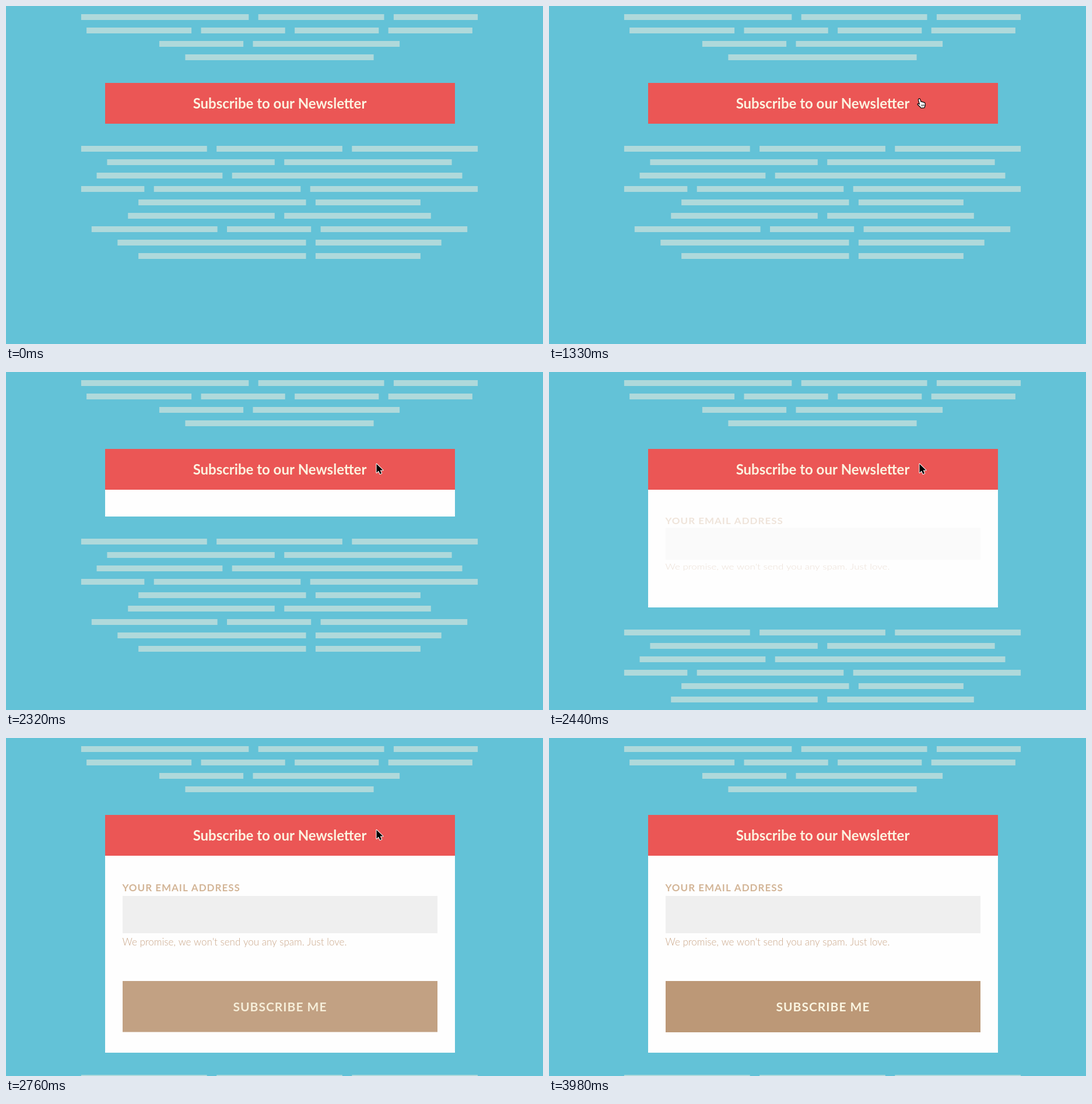
An HTML page with a canvas for the animation above (5300 ms loop, 921x580 px).

```html
<!DOCTYPE html>
<html lang="en">
<head>
<meta charset="utf-8">
<title>Newsletter</title>
<style>
  html, body { margin: 0; width: 100%; height: 100%; overflow: hidden; background: #63c2d7; }
  canvas { display: block; }
</style>
</head>
<body>
<canvas id="stage" width="921" height="580"></canvas>
<script>
const ctx = document.getElementById('stage').getContext('2d');
const LOOP = 5300;

const range = (start, step, count) => Array.from({ length: count }, (_, i) => start + i * step);
// Moments at which the picture is refreshed.
const ticks = [
  0, ...range(480, 70, 8), ...range(1030, 60, 6), 1660,
  2140, 2230, 2320, 2440, 2560, 2670, 2760, 2840, ...range(3200, 60, 14)
];

const clamp = v => Math.min(1, Math.max(0, v));
const progress = (t, start, end) => clamp((t - start) / (end - start));
const lerp = (a, b, p) => a.map((v, i) => v + (b[i] - v) * p);
const swing = p => 0.5 - Math.cos(Math.PI * p) / 2;
const easeOut = p => 1 - (1 - p) ** 2;
const bezier = (a, b, c, d, p) => a.map((v, i) =>
  (1 - p) ** 3 * v + 3 * (1 - p) ** 2 * p * b[i] + 3 * (1 - p) * p * p * c[i] + p ** 3 * d[i]);

function rect(color, x, y, w, h) {
  ctx.fillStyle = color;
  ctx.fillRect(x, y, w, h);
}

function text(str, x, y, color, font, align = 'left', spacing = 0) {
  ctx.font = font + ' Lato, sans-serif';
  ctx.textAlign = align;
  ctx.letterSpacing = spacing + 'px';
  ctx.fillStyle = color;
  ctx.fillText(str, x, y);
}

// Placeholder paragraphs: word lengths per centred line.
const INTRO = [[8, 6, 4], [5, 4, 4, 4], [4, 7], [9]];
const OUTRO = [[6, 6, 6], [8, 8], [6, 11], [3, 7, 8], [8, 5], [7, 7], [6, 4, 7], [9, 6], [8, 5]];
const GAP = 16.4;

function paragraph(lines, top) {
  lines.forEach((words, row) => {
    const widths = words.map(n => 35.8 * n + 1);
    const total = widths.reduce((a, b) => a + b) + GAP * (words.length - 1);
    let x = 469 - total / 2;
    for (const w of widths) {
      rect('#afd9db', x, top + 23 * row, w, 10);
      x += w + GAP;
    }
  });
}

// Fades in while unfolding downwards from its top edge.
function unfold(top, opacity, draw) {
  if (opacity <= 0) return;
  ctx.save();
  ctx.globalAlpha = opacity;
  ctx.translate(0, top);
  ctx.scale(1, 1 - 0.3 * (1 - opacity) ** 1.68);
  ctx.translate(0, -top);
  draw();
  ctx.restore();
}

function form(t, height) {
  ctx.save();
  ctx.beginPath();
  ctx.rect(170, 202, 600, height);
  ctx.clip();
  rect('#fefefe', 170, 202, 600, height);
  unfold(247, progress(t, 2350, 2612), () => {
    text('YOUR EMAIL ADDRESS', 199.5, 263, '#d3b597', '700 17px', 'left', 1);
    rect('#efefef', 200, 271, 540, 64);
    text("We promise, we won't send you any spam. Just love.", 199.5, 355.5, '#c9a587', '300 17px');
  });
  unfold(417, progress(t, 2522, 2784), () => {
    rect('#bc9877', 200, 417, 540, 88);
    text('SUBSCRIBE ME', 470, 469, '#fbf5e1', '700 21px', 'center', 1);
  });
  ctx.restore();
}

const ARROW = new Path2D('M0 0V15L3.6 11.8 6 17.2 8.6 16.1 6.2 10.8H11Z');
const HAND = new Path2D('M3.6 1.1C4.8.6 5.6 1.5 5.9 2.6L7 6.3C7.8 5.8 9 5.9 9.4 6.9C10.2 6.4 11.4 6.7 11.7 7.6' +
  'C12.7 7.3 13.7 7.8 14 8.8C14.5 10.5 14.5 12.2 13.8 13.8L12.9 16.6 7.1 17.2C5.8 15 3.1 13.4 1.3 11.2' +
  'C.6 10 1.9 9 3.1 9.7L4.4 10.7 2.4 3.2C2.2 2.1 2.6 1.4 3.6 1.1Z');
const KNUCKLES = new Path2D('M7.8 11.2L8.4 14.4M9.8 11L10.4 14.2M11.8 10.8L12.2 13.8');

const HOVER = [653, 182], REST = [635, 157], BEND = [848, 395];

function cursorAt(t) {
  if (t <= 970) return bezier([898, 218], [800, 218], [715, 220], HOVER, easeOut(progress(t, 480, 970)));
  if (t <= 3140) return lerp(HOVER, REST, easeOut(progress(t, 970, 1330)));
  if (t <= 3680) return bezier(REST, [760, 160], [815, 260], BEND, progress(t, 3140, 3680) ** 1.3);
  return lerp(BEND, [897, 615], progress(t, 3680, 3980));
}

function cursor(t) {
  if (t < 480) return;
  const [x, y] = cursorAt(t);
  const overButton = t < 2140 && x < 770 && y < 202;
  ctx.save();
  ctx.lineJoin = 'round';
  if (overButton) {
    const pressed = t >= 1660 ? 1 : 0;
    ctx.translate(x - 4, y + 1 + pressed);
    ctx.fillStyle = '#fff';
    ctx.strokeStyle = '#000';
    ctx.lineWidth = 1.2;
    ctx.fill(HAND);
    ctx.stroke(HAND);
    ctx.lineWidth = 0.8;
    ctx.stroke(KNUCKLES);
  } else {
    ctx.translate(x + 0.5, y + 0.8);
    ctx.strokeStyle = '#fff';
    ctx.lineWidth = 2;
    ctx.stroke(ARROW);
    ctx.fillStyle = '#000';
    ctx.fill(ARROW);
  }
  ctx.restore();
}

function draw(now) {
  const time = now % LOOP;
  const t = ticks.findLast(tick => tick <= time);
  const height = Math.round(338 * swing(progress(t, 2231, 2603)));

  rect('#63c2d7', 0, 0, 921, 580);
  paragraph(INTRO, 14);
  paragraph(OUTRO, 240 + height);
  if (height > 0) form(t, height);
  rect('#eb5655', 170, 132, 600, 70);
  text('Subscribe to our Newsletter', 469.5, 176, '#fcf3e0', '700 24px', 'center');
  cursor(t);
}

const begin = performance.now();
function frame() {
  draw(performance.now() - begin);
  requestAnimationFrame(frame);
}
frame();
</script>
</body>
</html>
```
